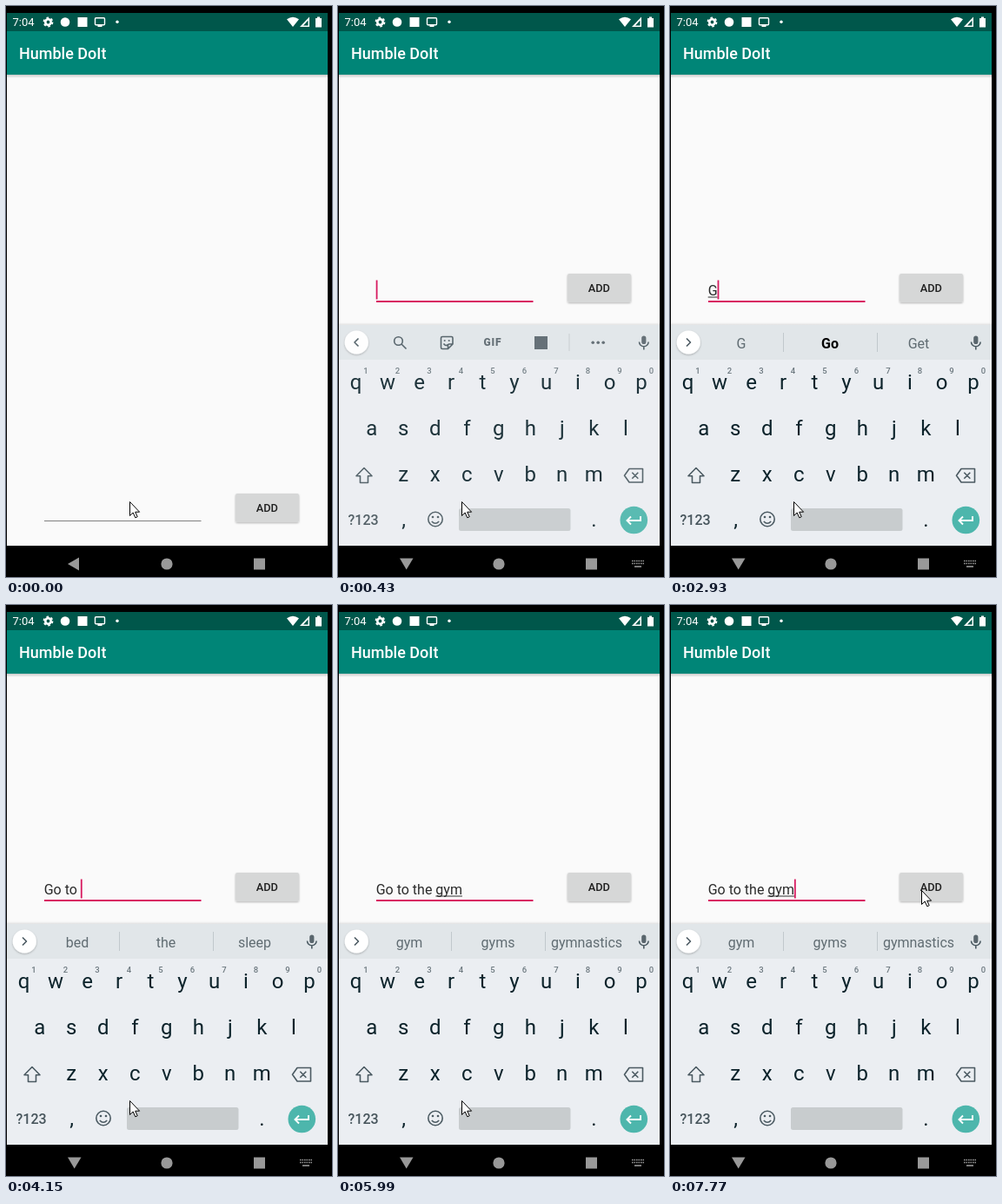
Recreate the animation shown at these times as an HTML page. Size 375 by 657 pixels, loop 8 s.

```html
<!DOCTYPE html>
<html lang="en">
<head>
<meta charset="utf-8">
<title>Humble DoIt</title>
<style>
  html, body { margin: 0; width: 100%; height: 100%; overflow: hidden; background: #000; }
  svg { display: block; width: 375px; height: 657px; font-family: Roboto, Arial, sans-serif; }
  text { white-space: pre; }
  .mid { text-anchor: middle; }
  .line { fill: none; stroke: #4b5a62; stroke-width: 1.6; stroke-linejoin: round; }
  .key { font-size: 24px; fill: #0c232b; text-anchor: middle; }
  .hint { font-size: 9.5px; font-weight: 500; fill: #6b777e; text-anchor: middle; }
  .word { font-size: 16px; fill: #606c72; text-anchor: middle; }
  .bold { font-weight: 700; fill: #050505; }
</style>
</head>
<body>
<svg viewBox="0 0 375 657">
  <defs>
    <linearGradient id="fade" x2="0" y2="1">
      <stop stop-color="#000" stop-opacity=".2"/><stop offset="1" stop-color="#000" stop-opacity="0"/>
    </linearGradient>
    <filter id="lift" x="-20%" y="-20%" width="140%" height="150%">
      <feDropShadow dx="0" dy="1" stdDeviation="1" flood-opacity=".28"/>
    </filter>
  </defs>

  <rect width="375" height="657"/>
  <rect x="1" y="8" width="369" height="613" fill="#fafafa"/>
  <rect x="1" y="79" width="369" height="4" fill="url(#fade)"/>
  <rect x="1" y="8" width="369" height="21" fill="#00574b"/>
  <rect x="1" y="29" width="369" height="50" fill="#008577"/>
  <text x="15" y="61" font-size="18" font-weight="500" fill="#fff">Humble DoIt</text>

  <!-- status bar -->
  <g fill="#fff">
    <text x="7.5" y="23" font-size="13">7:04</text>
    <g fill="none" stroke="#fff">
      <circle cx="48.5" cy="18.5" r="3.2" stroke-width="2.6"/>
      <circle cx="48.5" cy="18.5" r="5" stroke-width="1.8" stroke-dasharray="2.62"/>
      <rect x="102.5" y="13.7" width="11" height="8" rx="1" stroke-width="1.4"/>
    </g>
    <circle cx="68" cy="18.5" r="5.3"/>
    <rect x="82.5" y="13" width="11" height="11"/>
    <rect x="105.5" y="22" width="5" height="2"/>
    <circle cx="128" cy="18.3" r="1.7"/>
    <path d="M323 15.3Q330 10.2 337 15.3L330 24Z"/>
    <path d="M349 12.5V24H338Z"/>
    <path d="M347.5 16.5V22.5H342Z" fill="#00574b"/>
    <path d="M356 14h2v-1.6h3V14h2v10.4h-7Z"/>
  </g>

  <!-- entry row -->
  <g id="row">
    <rect id="rule" x="44" width="180.5"/>
    <text id="entry" x="43.7" y="333" font-size="16" fill="#2b2b2b"></text>
    <rect id="compose" y="334.5" height="1" fill="#333"/>
    <rect id="caret" y="315.5" width="1.8" height="22" fill="#d81b60"/>
    <rect x="264" y="308" width="73" height="33" rx="2" fill="#d6d7d7" filter="url(#lift)"/>
    <text class="mid" x="300.3" y="329" font-size="12.8" font-weight="500" fill="#212121">ADD</text>
  </g>

  <!-- keyboard -->
  <g id="board">
    <rect x="1" y="364" width="369" height="3" fill="url(#fade)" transform="matrix(1 0 0 -1 0 731)" opacity=".5"/>
    <rect x="1" y="367" width="369" height="254" fill="#ebeef2"/>
    <rect x="1" y="367" width="369" height="40" fill="#e1e6e9"/>
    <circle cx="21.3" cy="387" r="13.6" fill="#fff" filter="url(#lift)"/>
    <path id="chevron" class="line" stroke-linejoin="miter"/>
    <g fill="#5a666d">
      <rect x="349.2" y="379.5" width="5.2" height="9.5" rx="2.6"/>
      <path class="line" d="M346.5 386.5a5.3 5.3 0 0 0 10.6 0M351.8 392v3.5"/>
    </g>

    <g id="tools" fill="#5a666d">
      <circle class="line" cx="69.5" cy="385.5" r="4.8"/>
      <path class="line" stroke-width="2" d="M73 389l5.5 5.5"/>
      <path class="line" d="M120 380.5h10.5q1.5 0 1.5 1.5v7l-5.5 5.5h-6.5q-1.5 0-1.5-1.5v-11q0-1.5 1.5-1.5ZM126.5 394v-3.5q0-1.5 1.5-1.5h4M121.5 388.5q2.5 3.5 5 1"/>
      <circle cx="122.7" cy="385" r="1.1"/><circle cx="127.7" cy="385" r="1.1"/>
      <text class="mid" x="178" y="391.3" font-size="12" font-weight="900" letter-spacing=".8">GIF</text>
      <rect x="226" y="380" width="15" height="15"/>
      <rect x="265.5" y="377" width="1" height="20" fill="#c5cbd0"/>
      <circle cx="293.2" cy="387.3" r="1.8"/><circle cx="299.2" cy="387.3" r="1.8"/><circle cx="305.2" cy="387.3" r="1.8"/>
    </g>
    <g id="words">
      <rect x="130" y="376" width="1" height="22" fill="#c1c8cc"/>
      <rect x="238" y="376" width="1" height="22" fill="#c1c8cc"/>
      <text class="word" x="82" y="393.5"></text>
      <text class="word" x="184" y="393.5"></text>
      <text class="word" x="286" y="393.5"></text>
    </g>

    <g id="keys"></g>
    <path class="line" d="M30 531.5l9 9.3h-4.5v7.7h-9v-7.7H21Z"/>
    <path class="line" d="M335 532.5h15.5v15.5H335l-5.5-7.75ZM338.3 536.8l7 7M345.3 536.8l-7 7"/>
    <text x="11.5" y="597" font-size="16" font-weight="500" fill="#46545b">?123</text>
    <text class="key" x="75.5" y="599">,</text>
    <text class="key" x="294.5" y="599">.</text>
    <circle class="line" cx="112" cy="590.5" r="8.2"/>
    <path class="line" d="M107.8 593q4.2 4.6 8.4 0"/>
    <circle cx="109" cy="588" r="1.3" fill="#4b5a62"/><circle cx="115" cy="588" r="1.3" fill="#4b5a62"/>
    <rect x="139" y="578" width="128.5" height="26" rx="2.5" fill="#c8ccce"/>
    <circle cx="340.3" cy="591.5" r="15.8" fill="#4db6ac"/>
    <path d="M348 587v5h-15M337 587.5l-4.5 4.5 4.5 4.5" fill="none" stroke="#fff" stroke-width="1.9"/>
  </g>

  <!-- navigation bar -->
  <g fill="#999">
    <path id="back"/>
    <circle cx="185" cy="642" r="6.6"/>
    <rect x="285" y="635.5" width="13" height="13"/>
    <g id="swap" fill="none" stroke="#999" stroke-width="1.6">
      <path d="M338 638.5h14M338 641.5h14" stroke-dasharray="1.6 .9"/>
      <path d="M341 645h8"/>
    </g>
  </g>

  <path id="mouse" d="M.5 .5V16.5L4.2 13 6.8 18.8 9.2 17.7 6.7 12.2H11.6Z" fill="#fff" stroke="#000"/>
</svg>

<script>
const LOOP = 8000;
const $ = id => document.getElementById(id);
const set = (el, attrs) => { for (const k in attrs) el.setAttribute(k, attrs[k]); };
const show = (el, on) => el.setAttribute("visibility", on ? "visible" : "hidden");

// Each table lists [start time, values...]; the last row already begun holds.
const typing = [
  [0, ""],
  [2930, "G", "G", "Go", "Get"],
  [3330, "Go", "Go", "Good", "Got"],
  [3630, "Go ", "to", "for", "back"],
  [4030, "Go to", "today", "to", "took"],
  [4150, "Go to ", "bed", "the", "sleep"],
  [4680, "Go to t", "t", "the", "to"],
  [4830, "Go to the", "the", "they", "there"],
  [4950, "Go to the ", "store", "gym", "same"],
  [5200, "Go to the g", "g", "gym", "grocery"],
  [5340, "Go to the gy", "gy", "gym", "grocery"],
  [5590, "Go to the gym", "gym", "gyms", "gymnastics"]
];
const blink = [0, 130, 680, 1210, 1610, 2130, 2680, 2930, 5990, 6550, 7080, 7620]
  .map((t, i) => [t, i % 2 === 1]);
const pointer = [
  [0, 142, 570], [6550, 143, 566], [6680, 158, 546], [6800, 172, 514],
  [6950, 200, 457], [7080, 228, 403], [7230, 255, 372], [7380, 271, 352],
  [7500, 283, 337], [7620, 288, 330], [7770, 289, 328]
];
const reveal = [[0, 0], [430, .92], [550, .97], [680, 1]];
const at = (table, t) => table.findLast(row => row[0] <= t);

const pen = document.createElement("canvas").getContext("2d");
pen.font = "16px Roboto, Arial, sans-serif";
const widthOf = s => pen.measureText(s).width;

function addKey(cls, x, y, label) {
  const el = document.createElementNS("http://www.w3.org/2000/svg", "text");
  set(el, { class: cls, x, y });
  el.textContent = label;
  $("keys").append(el);
}
[["qwertyuiop", 20.5, 441], ["asdfghjkl", 38.8, 494], ["zxcvbnm", 75.2, 547]].forEach(([row, x0, y], r) =>
  [...row].forEach((ch, i) => {
    const x = x0 + i * 36.5;
    addKey("key", x, y, ch);
    if (!r) addKey("hint", x + 11.5, 423, (i + 1) % 10);
  }));

const slots = $("words").querySelectorAll("text");

function draw(t) {
  const focused = t >= 130, raised = t >= 280;
  const [, text, ...words] = at(typing, t);
  const word = text.lastIndexOf(" ") + 1;
  const left = 43.7 + widthOf(text.slice(0, word));
  const right = 43.7 + widthOf(text);

  set($("row"), { transform: `translate(0 ${raised ? 0 : 253})` });
  set($("rule"), focused
    ? { y: 339, height: 2, fill: "#d81b60" }
    : { y: 339, height: 1, fill: "#808080" });
  $("entry").textContent = text;
  set($("compose"), { x: left, width: right - left });
  set($("caret"), { x: right });
  show($("caret"), at(blink, t)[1]);

  set($("board"), { opacity: at(reveal, t)[1] });
  show($("tools"), !text);
  show($("words"), text);
  set($("chevron"), { d: text ? "M19 382.5l4.5 4.5-4.5 4.5" : "M23.5 382.5l-4.5 4.5 4.5 4.5" });
  slots.forEach((el, i) => {
    el.textContent = words[i] || "";
    el.classList.toggle("bold", i === 1 && text === "G");
  });

  set($("back"), { d: raised ? "M71 635.5H86.5L78.7 648.5Z" : "M84 634.5V649.5L71 642Z" });
  show($("swap"), raised);
  const [, x, y] = at(pointer, t);
  set($("mouse"), { transform: `translate(${x} ${y})` });
}

const start = performance.now();
function tick() {
  draw((performance.now() - start) % LOOP);
  requestAnimationFrame(tick);
}
tick();
</script>
</body>
</html>
```
